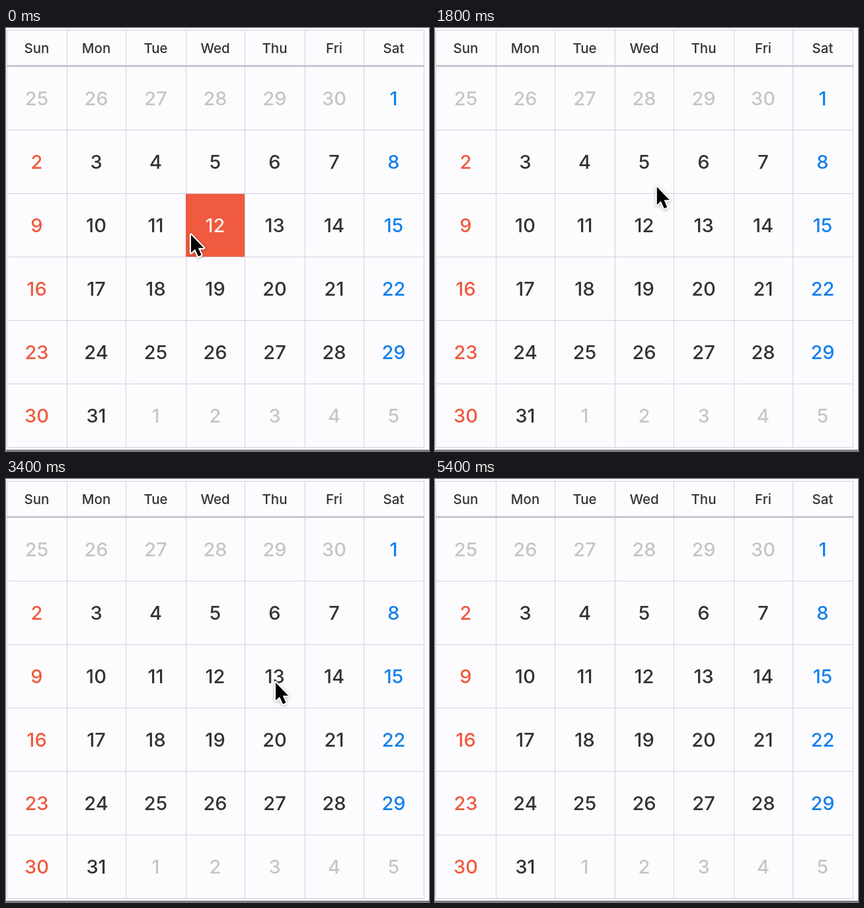
These frames come from a looping animation (640 by 640 pixels, 5.5 s). An HTML page with a canvas:

```html
<!DOCTYPE html>
<html lang="en">
<head>
<meta charset="utf-8">
<title>Calendar hover</title>
<style>
html, body { margin: 0; width: 100%; height: 100%; overflow: hidden; background: #fcfcfe; }
canvas { display: block; width: 640px; height: 640px; }
</style>
</head>
<body>
<canvas id="stage" width="640" height="640"></canvas>
<script>
const ctx = document.getElementById('stage').getContext('2d');
const LOOP = 5500, STEP = 100;
const DAYS = ['Sun', 'Mon', 'Tue', 'Wed', 'Thu', 'Fri', 'Sat'];
const WEEKS = 6, LEADING = 6, MONTH = 31, PREVIOUS = 30;
const COLOR = {
  paper: '#fcfcfe', line: '#d0d0de', rule: '#c6c6d6', edge: '#7c7c88',
  ink: '#333333', muted: '#c6c6c6', sunday: '#f05a3e', saturday: '#1480ec',
  active: '#f05a3e', activeInk: '#ffece8'
};

// Pointer stops: time, x, y
const STOPS = [
  [0, 279, 311], [600, 144, 301], [1300, 308, 380], [1400, 319, 259],
  [2100, 345, 225], [2200, 422, 362], [3200, 490, 380], [3400, 407, 306],
  [4200, 270, 330], [4400, 171, 369], [LOOP, 140, 700]
];

const colX = i => 1 + 90 * i + i % 2;
const rowY = i => 58 + 96 * i;
const ease = k => k * k * (3 - 2 * k);
const mix = (a, b, k) => a + (b - a) * k;

function pointerAt(t) {
  t = Math.max(0, t);
  const next = Math.max(1, STOPS.findIndex(stop => stop[0] >= t));
  const [t0, x0, y0] = STOPS[next - 1], [t1, x1, y1] = STOPS[next];
  const k = ease((t - t0) / (t1 - t0));
  return [mix(x0, x1, k), mix(y0, y1, k)];
}

function cellAt(t) {
  const [x, y] = pointerAt(t);
  const row = Math.floor((y - rowY(0)) / 96);
  const col = DAYS.findIndex((day, i) => x < colX(i + 1));
  return row < WEEKS ? row * 7 + col : -1;
}

// The highlight trails the pointer and needs it to settle in a cell.
function activeCell(t) {
  const cell = cellAt(t - STEP);
  return cell === cellAt(t - 2 * STEP) ? cell : -1;
}

function label(text, col, baseline, size, color) {
  ctx.font = `500 ${size}px Inter, sans-serif`;
  ctx.fillStyle = color;
  ctx.fillText(text, (colX(col) + colX(col + 1)) / 2, baseline);
}

function fillBox(color, x, y, width, height) {
  ctx.fillStyle = color;
  ctx.fillRect(x, y, width, height);
}

function drawGrid() {
  for (let i = 0; i <= 7; i++) fillBox(COLOR.line, colX(i), 3, 1, 632);
  for (let i = 1; i <= WEEKS; i++) fillBox(COLOR.line, 1, rowY(i), 632, 1);
  fillBox(COLOR.line, 1, 3, 632, 1);
  fillBox(COLOR.rule, 1, 56, 632, 3);
  fillBox(COLOR.edge, 0, 638, 640, 2);
}

function drawDay(index, active) {
  const col = index % 7, row = Math.floor(index / 7);
  const day = index - LEADING + 1;
  let number = day, color = COLOR.ink;

  if (day < 1) number = day + PREVIOUS;
  if (day > MONTH) number = day - MONTH;

  if (number !== day) color = COLOR.muted;
  else if (col === 0) color = COLOR.sunday;
  else if (col === 6) color = COLOR.saturday;

  if (active) {
    const left = colX(col), top = rowY(row) + 1;
    fillBox(COLOR.active, left, top, colX(col + 1) - left, 95);
    color = COLOR.activeInk;
  }
  label(number, col, rowY(row) + 59, 29, color);
}

function drawPointer([x, y]) {
  ctx.save();
  ctx.translate(x, y);
  const arrow = new Path2D('M1 2V29L7 23.5L12 34.5L16.5 32.5L11.8 21.8H20Z');
  ctx.lineJoin = 'round';
  ctx.lineWidth = 4.5;
  ctx.strokeStyle = '#fff';
  ctx.shadowColor = 'rgba(0, 0, 0, .3)';
  ctx.shadowBlur = 4;
  ctx.shadowOffsetY = 1;
  ctx.stroke(arrow);
  ctx.shadowColor = 'transparent';
  ctx.fillStyle = '#000';
  ctx.fill(arrow);
  ctx.restore();
}

function draw(t) {
  const active = activeCell(t);
  fillBox(COLOR.paper, 0, 0, 640, 640);
  ctx.textAlign = 'center';
  drawGrid();
  DAYS.forEach((name, col) => label(name, col, 38, 20.5, COLOR.ink));
  for (let i = 0; i < WEEKS * 7; i++) drawDay(i, i === active);
  drawPointer(pointerAt(t));
}

function frame() {
  const t = performance.now() % LOOP;
  draw(Math.floor(t / STEP) * STEP);
  requestAnimationFrame(frame);
}
frame();
</script>
</body>
</html>
```
